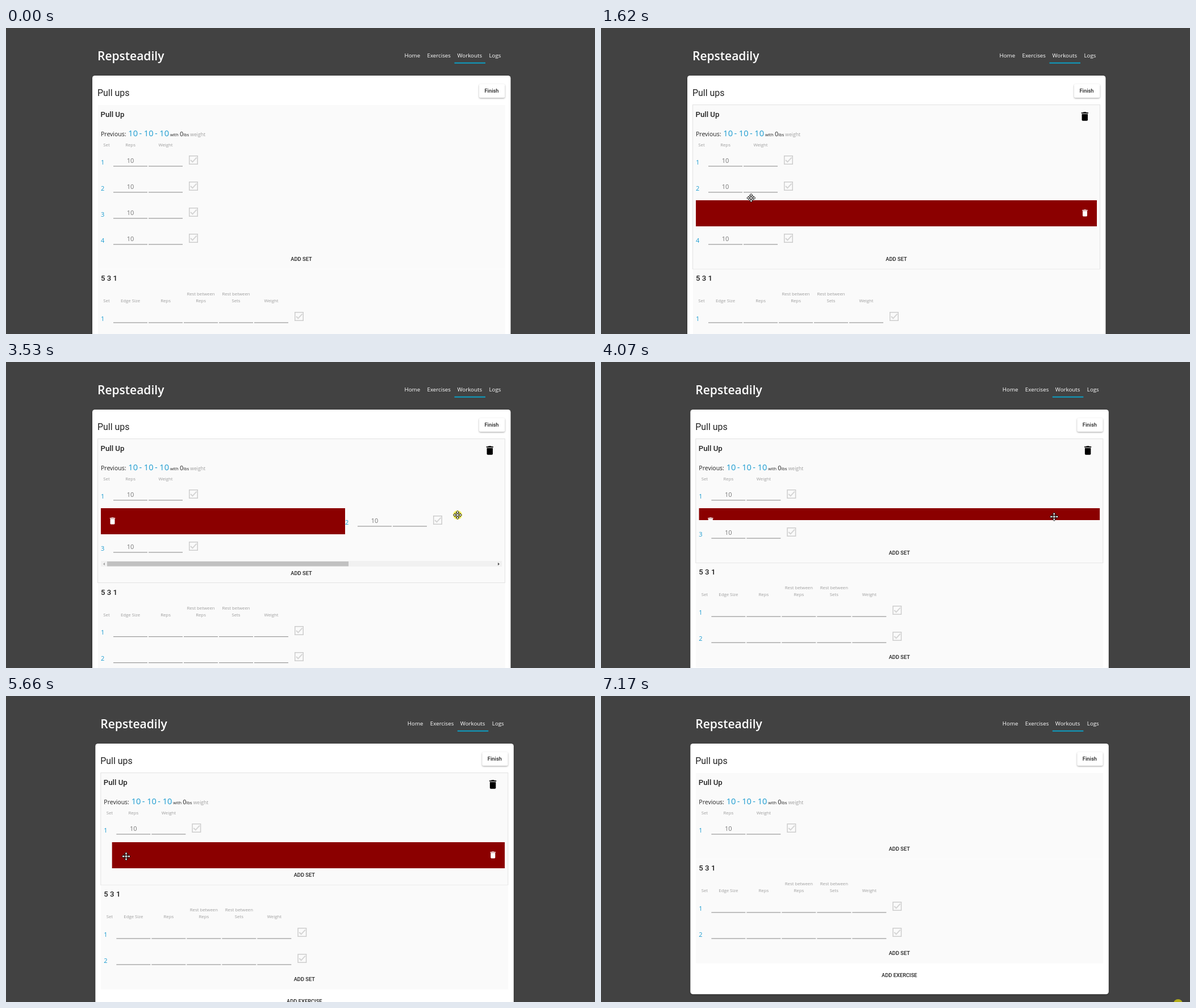
An HTML page with a canvas for the animation above (7250 ms loop, 1037 by 540 pixels).

```html
<!DOCTYPE html>
<html lang="en">
<head>
<meta charset="utf-8">
<title>Workout log</title>
<style>
html, body { margin: 0; width: 100%; height: 100%; overflow: hidden; background: #424242; }
canvas { display: block; }
</style>
</head>
<body>
<canvas id="stage" width="1037" height="540"></canvas>
<script>
const ctx = document.getElementById('stage').getContext('2d');
const LOOP = 7250;
const SANS = '"Open Sans", "Noto Sans", sans-serif';
const ROBOTO = 'Roboto, sans-serif';
const BLUE = '#1a9bd0', GREY = '#9e9e9e', DARK = '#212121', RED = '#8b0000';
const LEFT = 167, RIGHT = 873, WIDTH = RIGHT - LEFT, CENTER = 520;
const ROWS_TOP = 212.2, ROW = 46, SCROLLBAR = 10.7;
const SLIDE = 150, COLLAPSE_DELAY = 300, COLLAPSE = 150;
const PAGE_SHIFT_AT = 4030, PAGE_SHIFT = 5.33;

// time, x, y of the pointer
const pointerPath = [
  [0, 1016, 545], [70, 942, 508], [420, 372, 326], [480, 365, 326],
  [760, 185, 322], [1000, 112, 316], [1250, 112, 316], [1620, 264, 300],
  [1950, 365, 279], [2050, 365, 278], [2410, 562, 276], [2730, 713, 272],
  [3530, 795, 270], [3690, 796, 271], [4070, 798, 273], [4500, 716, 281],
  [4650, 710.5, 281], [4790, 658, 281], [5350, 211.5, 283], [5890, 211.5, 283],
  [6620, 898, 506], [6850, 1016, 543], [LOOP, 1016, 543]
];

const swipes = [
  { row: 2, dir: -1, grab: 480, release: 1330 },
  { row: 1, dir: 1, grab: 2050, release: 3690 },
  { row: 1, dir: -1, grab: 4650, release: 5588 }
];
const lastPress = 7170;

const trash = new Path2D('M6 19c0 1.1.9 2 2 2h8c1.1 0 2-.9 2-2V7H6v12zM19 4h-3.5l-1-1h-5l-1 1H5v2h14V4z');
const arrow = new Path2D('M0 0V15.5L3.6 12.2L6 17.8L8.4 16.8L6 11.3H11Z');
const fourWay = new Path2D('M0-7.5L3-4.2H1V-1H4.2V-3L7.5 0L4.2 3V1H1V4.2H3L0 7.5L-3 4.2H-1V1H-4.2V3L-7.5 0L-4.2-3V-1H-1V-4.2H-3Z');

const clamp01 = v => Math.max(0, Math.min(1, v));
const mix = (a, b, u) => a + (b - a) * u;

function pointerAt(t) {
  const i = pointerPath.findIndex(p => p[0] > t);
  const [a, b] = [pointerPath[i - 1], pointerPath[i]];
  const u = (t - a[0]) / (b[0] - a[0]);
  return { x: mix(a[1], b[1], u), y: mix(a[2], b[2], u) };
}

function swipeOffset(s, t) {
  const dragged = pointerAt(Math.min(t, s.release)).x - pointerAt(s.grab).x;
  const u = clamp01((t - s.release) / SLIDE);
  return mix(dragged, s.dir * WIDTH, 1 - (1 - u) ** 4);
}

function text(str, x, y, size, color, family = SANS, weight = 400, align = 'left') {
  ctx.font = `${weight} ${size}px ${family}`;
  ctx.fillStyle = color;
  ctx.textAlign = align;
  ctx.fillText(str, x, y);
}

function rect(x, y, w, h, color) {
  ctx.fillStyle = color;
  ctx.fillRect(x, y, w, h);
}

function raisedBox(x, y, w, h, radius) {
  ctx.save();
  ctx.shadowColor = 'rgba(0,0,0,.33)';
  ctx.shadowBlur = 3;
  ctx.shadowOffsetY = 1.2;
  ctx.fillStyle = '#fff';
  ctx.beginPath();
  ctx.roundRect(x, y, w, h, radius);
  ctx.fill();
  ctx.restore();
}

function polygon(color, ...points) {
  ctx.fillStyle = color;
  ctx.beginPath();
  points.forEach(p => ctx.lineTo(...p));
  ctx.fill();
}

function icon(x, y, scale, color) {
  ctx.save();
  ctx.translate(x, y);
  ctx.scale(scale, scale);
  ctx.translate(-12, -12);
  ctx.fillStyle = color;
  ctx.fill(trash);
  ctx.restore();
}

const button = (label, y) => text(label, CENTER, y, 9.33, DARK, ROBOTO, 500, 'center');
const heading = (label, x, y) => text(label, x, y, 7.8, GREY, SANS, 400, 'center');

function checkbox(x, y) {
  ctx.strokeStyle = '#cdcdcd';
  ctx.lineWidth = 1.5;
  ctx.strokeRect(x + .75, y + .75, 14.5, 14.5);
  ctx.strokeStyle = '#d4d4d4';
  ctx.lineWidth = 1.9;
  ctx.beginPath();
  ctx.moveTo(x + 3, y + 8);
  ctx.lineTo(x + 6.4, y + 11.4);
  ctx.lineTo(x + 13.6, y + 3.6);
  ctx.stroke();
}

function setRow(number, x, top, columns, reps) {
  text(number, x, top + 28.4, 11, BLUE);
  if (reps) text(reps, x + 52, top + 25.6, 11, '#757575', SANS, 400, 'center');
  for (let i = 0; i < columns; i++) rect(x + 22 + 62 * i, top + 31.2, 60, 1, '#858585');
  checkbox(x + 31 + 62 * columns, Math.floor(top + 13.2));
}

function swipedRow(number, rowTop, rowHeight, offset) {
  const top = Math.round(rowTop), height = Math.round(rowTop + rowHeight) - top;
  ctx.save();
  ctx.beginPath();
  ctx.rect(LEFT, top, WIDTH, height);
  ctx.clip();
  setRow(number, LEFT + offset, rowTop, 2, '10');
  const x = offset < 0 ? RIGHT + offset : LEFT;
  rect(x, top, Math.abs(offset), height, RED);
  ctx.beginPath();
  ctx.rect(x, top, Math.abs(offset), height);
  ctx.clip();
  icon(offset < 0 ? 852 : 187.5, top + 22.4, .667, '#fff');
  ctx.restore();
}

function scrollbar(y, offset) {
  const track = WIDTH - 22, mid = y + 5.5;
  rect(LEFT, y, WIDTH, 10, '#f1f1f1');
  rect(LEFT + 11, y + 1, track * WIDTH / (WIDTH + offset), 8.5, '#c1c1c1');
  polygon('#a3a3a3', [171, mid], [174, mid - 2.5], [174, mid + 2.5]);
  polygon('#505050', [869, mid], [866, mid - 2.5], [866, mid + 2.5]);
}

function panel(top, bottom, hovered) {
  rect(162, top, 717, bottom - top, '#fafafa');
  if (!hovered) return;
  ctx.strokeStyle = '#e2e2e2';
  ctx.lineWidth = 1;
  ctx.strokeRect(161.5, Math.round(top) - .5, 717, Math.round(bottom - top));
  icon(851.8, top + 20, .87, '#000');
}

function header() {
  text('Repsteadily', 161, 57, 21, '#fff', SANS, 600);
  [['Home', 701.5], ['Exercises', 741.5], ['Workouts', 794.5], ['Logs', 850.5]]
    .forEach(([label, x]) => text(label, x, 52, 9.75, '#fff'));
  rect(789.5, 60.7, 54.5, 2, '#0c9fc4');
}

function previousResult() {
  text('Previous:', LEFT, 190.5, 10.5, DARK);
  [215.3, 242.8, 270.3].forEach(x => text('10', x, 190.5, 14.6, BLUE));
  [234.5, 262].forEach(x => text('-', x, 190.5, 14.6, BLUE));
  text('with', 289, 190.5, 7.4, DARK);
  text('0', 306, 190.5, 11, DARK);
  text('lbs', 312.3, 190.5, 7.4, DARK);
  text('weight', 324.3, 190.5, 8.6, GREY);
}

function finishButton() {
  raisedBox(833, 99, 45.3, 24, 2.5);
  text('Finish', 855, 114, 9.33, DARK, ROBOTO, 500, 'center');
}

function pointer(p, overRow, pressed) {
  if (pressed) {
    ctx.fillStyle = 'rgba(255,245,0,.6)';
    ctx.beginPath();
    ctx.arc(p.x, p.y, 8, 0, 7);
    ctx.fill();
  }
  ctx.save();
  ctx.translate(p.x, p.y);
  const shape = overRow ? fourWay : arrow;
  ctx.fillStyle = '#fff';
  ctx.strokeStyle = '#000';
  ctx.lineWidth = 1;
  ctx.fill(shape);
  ctx.stroke(shape);
  ctx.restore();
}

function draw(t) {
  const shift = t >= PAGE_SHIFT_AT ? PAGE_SHIFT : 0;
  const p = pointerAt(t);
  const done = swipes.filter(s => t >= s.release + COLLAPSE_DELAY + COLLAPSE).length;
  const swipe = swipes.find((s, i) => i === done && t >= s.grab);
  const offset = swipe ? swipeOffset(swipe, t) : 0;
  const collapsed = swipe ? clamp01((t - swipe.release - COLLAPSE_DELAY) / COLLAPSE) : 0;
  const scrolling = offset > 0 && !collapsed;

  const rowsEnd = ROWS_TOP + (4 - done - collapsed) * ROW;
  const addSet = rowsEnd + (scrolling ? SCROLLBAR : 0);
  const top2 = addSet + 29.4;
  const rows2 = top2 + 62.7;
  const rowsEnd2 = rows2 + 2 * ROW;
  const bottom2 = rowsEnd2 + 29.4;
  const within = (a, b, x0 = 162, x1 = 879) =>
    p.x - shift > x0 && p.x - shift < x1 && p.y >= a && p.y < b;

  rect(0, 0, 1037, 540, '#424242');
  ctx.save();
  ctx.translate(shift, 0);
  header();
  raisedBox(152, 84, 736.5, bottom2 + 54.5 - 84, 4.5);
  text('Pull ups', 161, 120.3, 15.9, DARK, ROBOTO);
  finishButton();

  panel(136, top2, within(136, top2));
  panel(top2, bottom2, within(top2, bottom2));

  text('Pull Up', LEFT - .5, 156.5, 13.2, DARK, ROBOTO, 500);
  previousResult();
  heading('Set', 177, 208.5);
  heading('Reps', 219, 208.5);
  heading('Weight', 281, 208.5);
  let y = ROWS_TOP;
  for (let i = 0; i < 4 - done; i++) {
    const active = swipe && swipe.row === i;
    const height = active ? ROW * (1 - collapsed) : ROW;
    if (active) swipedRow(i + 1, y, height, offset);
    else setRow(i + 1, LEFT, y, 2, '10');
    y += height;
  }
  if (scrolling) scrollbar(Math.round(rowsEnd + .5), offset);
  button('ADD SET', addSet + 14.8);

  text('5 3 1', LEFT, top2 + 20.7, 13.2, DARK, ROBOTO, 500);
  ['Edge Size', 'Reps', 'Rest between/Reps', 'Rest between/Sets', 'Weight'].forEach((label, i) => {
    const lines = label.split('/').reverse();
    lines.forEach((line, k) => heading(line, 219 + 62 * i, top2 + 58.7 - 12.4 * k));
  });
  heading('Set', 177, top2 + 58.7);
  setRow(1, LEFT, rows2, 5);
  setRow(2, LEFT, rows2 + ROW, 5);
  button('ADD SET', rowsEnd2 + 14.8);
  button('ADD EXERCISE', bottom2 + 24.4);
  ctx.restore();

  const overRow = within(ROWS_TOP, rowsEnd, LEFT, RIGHT) || within(rows2, rowsEnd2, LEFT, RIGHT);
  const pressed = t >= lastPress || swipes.some(s => t >= s.grab && t < s.release);
  if (t >= 70) pointer(p, overRow, pressed);
}

const start = performance.now();
function tick() {
  draw((performance.now() - start) % LOOP);
  requestAnimationFrame(tick);
}
tick();
</script>
</body>
</html>
```
